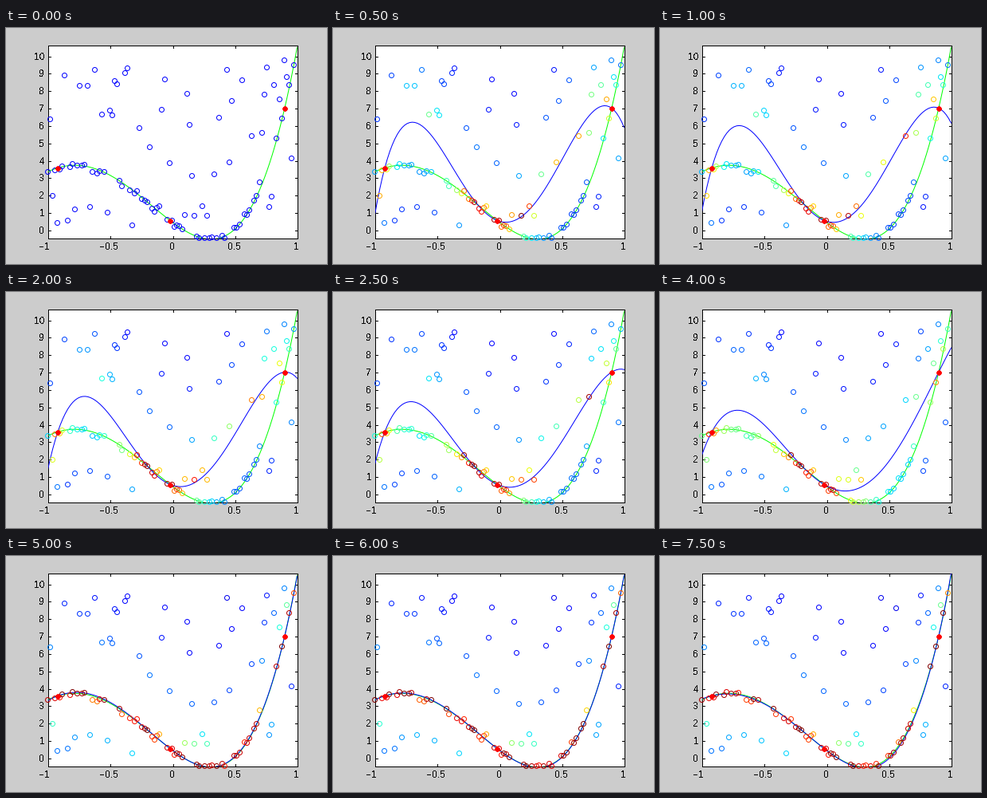
A matplotlib script that plays this animation: 403 by 296 pixels, repeating every 8000 ms.

```python
import numpy as np
import matplotlib as mpl
import matplotlib.pyplot as plt
from matplotlib.animation import FuncAnimation
from matplotlib.patches import Rectangle

W, H, DPI = 403, 296, 64
PT = 72 / DPI  # points per pixel
LEFT, TOP, RIGHT, BOTTOM = 52.5, 21.5, 365.5, 263.5
Y_ZERO, Y_UNIT = 253.5, 21.85
FRAMES = 16

mpl.rcParams["font.family"] = "Liberation Sans"
mpl.rcParams["text.antialiased"] = False


def px(x):
    return LEFT + (x + 1) * (RIGHT - LEFT) / 2


def py(y):
    return Y_ZERO - Y_UNIT * y


def pixel(v):
    """Centre of the pixel that holds v."""
    return np.floor(v) + 0.5


NODES = np.array([-0.92, -0.02, 0.9])


def true_curve(x):
    return np.polyval([2.49, 8.88, 3.98, -5.31, 0.45], x)


def fit_curve(x, i):
    """Fit after step i: always through the nodes, slow at first, then a jump."""
    steps = [1, 4, 6, 8, 9, 10, 15]
    a = np.interp(i, steps, [-3.45, -3.3, -2.7, -1.6, -0.1, 0.05, 0.1])
    b = np.interp(i, steps, [-20, -16.3, -11.8, -9.1, -1.2, -0.3, 0.4])
    return true_curve(x) + np.polyval(np.poly(NODES), x) * (a + b * x)


# Noisy samples of the curve, more than half of them replaced by outliers
rng = np.random.default_rng(7)
xs = np.arange(-1, 0.99, 0.02)
noisy = true_curve(xs) + rng.normal(0, 0.12, xs.size)
is_outlier = rng.random(xs.size) < 0.57
ys = np.where(is_outlier, rng.uniform(0, 10.4, xs.size), noisy)
ys = np.maximum(ys, -0.45)

fig = plt.figure(figsize=(W / DPI, H / DPI), dpi=DPI, facecolor="#cccccc")
ax = fig.add_axes([0, 0, 1, 1])
ax.set(xlim=(0, W), ylim=(H, 0))
ax.axis("off")

frame = Rectangle((LEFT, TOP), RIGHT - LEFT, BOTTOM - TOP,
                  fc="white", ec="black", lw=PT)
ax.add_patch(frame)


def segment(x0, y0, x1, y1):
    ax.plot([x0, x1], [y0, y1], color="black", lw=PT)


def label(x, y, text, ha):
    ax.text(x, y, text, ha=ha, va="center_baseline", fontsize=12 * PT)


for v in np.linspace(-1, 1, 5):
    x = pixel(px(v))
    segment(x, BOTTOM, x, BOTTOM - 3)
    segment(x, TOP, x, TOP + 3)
    minus_shift = 3 if v == -1 else 0
    label(x - 1 - minus_shift, 273.5, f"{v:g}".replace("-", "\u2212"), "center")

for v in range(11):
    y = pixel(py(v))
    segment(LEFT, y, LEFT + 3, y)
    segment(RIGHT, y, RIGHT - 3, y)
    label(48.5, y, str(v), "right")

grid = np.linspace(-1, 1, 101)


def curve(color):
    line, = ax.plot([], [], color=color, lw=PT, zorder=3)
    line.set_clip_path(frame)
    return line


green = curve("#00ff00")
green.set_data(px(grid), py(true_curve(grid)))
blue = curve("#0000ff")

dots = ax.scatter(pixel(px(xs) - 0.5), pixel(py(ys)), s=(6 * PT) ** 2,
                  facecolors="none", edgecolors="#0000ff", linewidths=PT,
                  zorder=4)
ax.plot(pixel(px(NODES) - 0.5), pixel(py(true_curve(NODES))), ls="none",
        marker=(8, 2, 0), ms=6 * PT, mew=2 * PT, color="#ff0000", zorder=5)

jet = plt.get_cmap("jet", 64)


def update(i):
    if i == 0:
        blue.set_data([], [])
        dots.set_edgecolor("#0000ff")
    else:
        blue.set_data(px(grid), py(fit_curve(grid, i)))
        weight = 1 / (1 + np.abs(ys - fit_curve(xs, i)))
        dots.set_edgecolor(jet(weight))
    return blue, dots


anim = FuncAnimation(fig, update, frames=FRAMES, interval=500,
                     repeat=True, repeat_delay=0)
plt.show()
```
